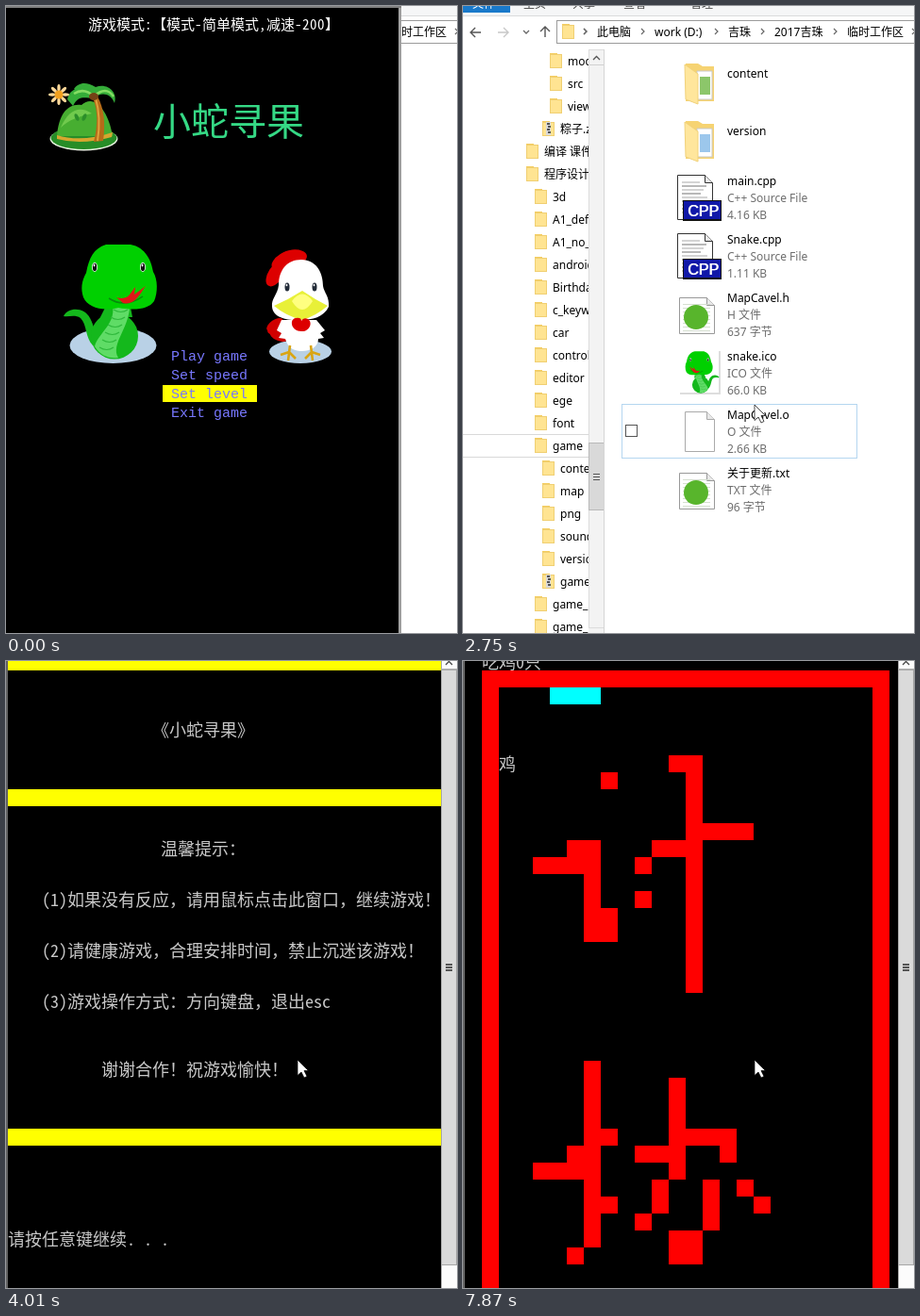
An HTML page with a canvas that plays this animation: 478x665 px, repeating every 8 s.

```html
<!DOCTYPE html>
<html lang="zh">
<head>
<meta charset="utf-8">
<title>Snake game</title>
<style>
html, body { margin: 0; width: 100%; height: 100%; overflow: hidden; background: #fff; }
canvas { display: block; }
</style>
</head>
<body>
<canvas id="stage" width="478" height="665"></canvas>
<script>
const g = document.getElementById('stage').getContext('2d');
const W = 478, H = 665, LOOP = 8000;
const UI = '"Noto Sans", "Noto Sans CJK SC", sans-serif';
const CJK = '"Noto Sans Mono CJK SC", "Noto Sans CJK SC", "Noto Sans Mono", monospace';
const TITLE = '"Noto Sans CJK SC", sans-serif';
const TEAL = '#008080', GREEN = '#008000', GOLD = '#ffff00', RED = '#ff0000';

function rect(x, y, w, h, color) {
  g.fillStyle = color;
  g.fillRect(x, y, w, h);
}

function frame(x, y, w, h, color) {
  g.strokeStyle = color;
  g.lineWidth = 1;
  g.strokeRect(x + 0.5, y + 0.5, w - 1, h - 1);
}

function oval(x, y, rx, ry, color, turn = 0) {
  g.fillStyle = color;
  g.beginPath();
  g.ellipse(x, y, rx, ry, turn, 0, 7);
  g.fill();
}

function shape(d, fill, line, width = 1) {
  const p = new Path2D(d);
  if (fill) { g.fillStyle = fill; g.fill(p); }
  if (line) { g.strokeStyle = line; g.lineWidth = width; g.stroke(p); }
}

// y is the middle of the line
function text(s, x, y, size, color, font = UI) {
  g.font = `${size}px ${font}`;
  g.fillStyle = color;
  g.fillText(s, x, y + size * 0.38);
}

// console type: wide glyphs take two cells
function grid(s, x, y, size, color, font = CJK, weight = 400) {
  g.font = `${weight} ${size}px ${font}`;
  g.fillStyle = color;
  for (const ch of s) {
    g.fillText(ch, x, y + size * 0.38);
    x += ch.charCodeAt(0) > 255 ? size : Math.ceil(size / 2);
  }
}

function cell(c, r, cw, color) {
  rect(2 + c * cw, r * 18 - 8, cw, 18, color);
}

// lines of cells through key points, as "column,row column,row"
function trace(color, cw, ...lines) {
  for (const line of lines) {
    const pts = line.split(' ').map(p => p.split(',').map(Number));
    pts.forEach(([c, r], i) => {
      const [c0, r0] = pts[Math.max(0, i - 1)];
      const n = Math.max(Math.abs(c - c0), Math.abs(r - r0), 1);
      for (let k = 0; k <= n; k++) {
        cell(Math.round(c0 + (c - c0) * k / n), Math.round(r0 + (r - r0) * k / n), cw, color);
      }
    });
  }
}

function pointer() {
  shape('M309 423V439.5L313 436L316 442L319 440.5L316 434.5H320.5Z', '#fff', '#000', 0.7);
}

/* ---- characters ---- */

function snake() {
  shape('M61 329C66 319 83 319 89 331C94 340 93 346 98 352L92 360C84 352 86 338 79 331C73 327 67 330 61 329Z', '#14b81c');
  shape('M108 314L100 330H134L131 314Z', '#14b81c');
  oval(115, 350, 25, 24.5, '#14b81c');
  shape('M112 314C119 336 98 346 94 361C101 372 110 374 119 373C110 358 133 340 131 314Z', '#5fdc66');
  for (let i = 0; i < 6; i++) {
    const x = 114 - i * 3, y = 322 + i * 8;
    shape(`M${x} ${y}Q${x + 8} ${y + 5} ${x + 15} ${y}`, null, '#2fb83c', 1.2);
  }
  shape('M106 253H132C148 256 154 270 156 282C161 290 161 304 157 313C151 322 136 323 119 320C102 324 87 320 82 309C79 300 80 292 85 283C88 267 93 257 106 253Z', '#00d000');
  shape('M109 310Q126 321 145 308', null, '#078b0c', 1.5);
  shape('M117 309C131 313 132 303 137 298L136 306L148 297C141 307 136 318 124 315Z', '#e01818');
  for (const x of [94, 145]) {
    oval(x, 277, 3, 5, '#fff');
    oval(x, 277, 2.2, 4.2, '#111');
    oval(x - 0.5, 275, 0.9, 1.4, '#fff');
  }
}

function chicken(white) {
  oval(312, 366.5, 33, 12.5, '#b9d1e6');
  for (let i = 0; i < 3; i++) oval(285 + i * 2, 338 + i * 6, 10, 5, '#d00000', -0.6 + i * 0.5);
  for (let i = 0; i < 4; i++) oval(286 + i * 9, 284 - 18 * Math.sin(i * 0.9), 15, 8, '#dd0000', -1 + i * 0.45);
  shape('M292 333L287 344L292 347L289 352L296 353C299 364 307 366 314 366C322 366 331 362 331 353L337 352L333 347L338 344L329 333Z', white);
  shape('M313 269C329 269 336 283 336 297C337 304 343 308 342 319C337 330 324 333 313 333C299 334 283 331 282 319C281 310 288 306 289 296C289 280 298 269 313 269Z', white);
  shape('M284 318Q300 311 314 302Q327 311 341 318Q328 329 314 333Q297 329 284 318Z', '#e8f038');
  shape('M303 313Q314 298 325 313Q314 331 303 313Z', '#ffff80');
  shape('M313 345C302 345 300 332 307 331Q313 330 313 334Q315 330 320 332C326 336 321 346 313 345Z', '#dd0000');
  for (const x of [298, 327]) {
    oval(x, 298, 2.5, 4.5, '#222b38');
    oval(x - 0.5, 296, 0.9, 1.3, '#fff');
  }
  shape('M301 360L299 376M300 367L291 370M300 367L307 374M323 360L325 376M324 367L333 370M324 367L317 374', null, '#d9a514', 2.6);
}

function island() {
  oval(82.5, 141, 36, 12.5, '#e8f4e0');
  oval(82.5, 140, 35, 12, '#278d27');
  shape('M54 138C56 115 65 103 80 105C94 92 109 112 113 138Z', '#47ae31');
  shape('M58 129C66 110 78 105 91 114C77 117 66 121 58 129Z', '#70ca4d');
  shape('M54 137Q80 145 113 134L112 139Q80 148 54 141Z', '#d6a72f');
  shape('M92 98Q100 116 93 144L103 143Q107 114 97 96Z', '#b66b18');
  shape('M95 98Q101 118 97 143', null, '#e0a13d', 2);
  shape('M93 98C84 83 68 85 65 99L71 106C77 94 84 98 93 98C100 91 111 92 115 103C119 91 107 81 95 86C84 79 76 82 72 88Z', '#35ad39');
  shape('M72 93Q83 86 93 96Q106 84 114 96', null, '#84dd63', 2.5);
  oval(93, 96, 5, 4, '#754215');
  for (const side of [-1, 1]) oval(79 + side * 4, 118, 2, 4, '#2c8e2a', side * 0.4);
  for (let i = 0; i < 8; i++) {
    const a = i * Math.PI / 4;
    oval(56 + Math.cos(a) * 7, 94 + Math.sin(a) * 7, 4, 1.7, '#ffd99a', a);
  }
  oval(56, 94, 4.5, 4.5, '#f2a01e');
}

/* ---- file manager ---- */

function folder(x, y) {
  rect(x, y - 8, 8, 15, '#f4cd60');
  rect(x + 1, y - 6, 11, 14, '#ffe492');
  frame(x, y - 7, 13, 15, '#f0cf72');
}

function zip(x, y) {
  folder(x, y);
  rect(x + 4, y - 7, 5, 14, '#d9d9d9');
  for (let i = 0; i < 4; i++) rect(x + 5 + i % 2, y - 6 + i * 3, 3, 2, '#555');
}

function bigFolder(y, tint) {
  shape(`M236 ${y - 20}H249L254 ${y - 17}H266V${y + 20}H236Z`, '#f6d372');
  shape(`M248 ${y - 12}H264V${y + 18}H248Z`, '#fff', '#c9c9c9');
  rect(251, y - 6, 11, 19, tint);
  shape(`M235 ${y - 19}L249 ${y - 9}V${y + 23}L236 ${y + 18}Z`, '#ffe69c', '#f1d27b');
}

function page(x, y, w, h, edge = '#aaa') {
  shape(`M${x} ${y}H${x + w - 8}L${x + w} ${y + 8}V${y + h}H${x}Z`, '#fff', edge);
  shape(`M${x + w - 8} ${y}V${y + 8}H${x + w}`, '#e8e8e8', edge);
}

function cppIcon(y) {
  page(227.5, y - 23.5, 37, 47, '#333');
  for (let i = 0; i < 9; i++) rect(232, y - 17 + i * 4, 19 + i * 7 % 10, 2, i % 2 ? '#b8b8b8' : '#d4d4d4');
  rect(233, y + 3, 41, 22, '#111');
  rect(234, y + 4, 39, 19, '#1018a8');
  text('CPP', 238, y + 14, 16, '#fff', '"Liberation Sans", sans-serif');
  text('CPP', 238.7, y + 14, 16, '#fff', '"Liberation Sans", sans-serif');
}

function noteIcon(y) {
  page(229.5, y - 17.5, 37, 38, '#999');
  for (let i = 0; i < 8; i++) rect(233, y - 11 + i * 4, 29, 1, '#d5dfd0');
  oval(247, y + 3, 13, 13, '#58b52c');
}

function snakeIcon() {
  rect(230, 366, 43, 46, '#ddd');
  rect(229, 365, 42, 45, '#fff');
  g.save();
  g.translate(294, 274);
  g.scale(-0.365, 0.365);
  snake();
  g.restore();
}

const FILES = [
  ['main.cpp', 'C++ Source File', '4.16 KB', cppIcon],
  ['Snake.cpp', 'C++ Source File', '1.11 KB', cppIcon],
  ['MapCavel.h', 'H 文件', '637 字节', noteIcon],
  ['snake.ico', 'ICO 文件', '66.0 KB', snakeIcon],
  ['MapCavel.o', 'O 文件', '2.66 KB', y => page(235.5, y - 20.5, 31, 42)],
  ['关于更新.txt', 'TXT 文件', '96 字节', noteIcon]
];

function files() {
  bigFolder(81, '#8cc66a');
  text('content', 280, 71, 12, '#000');
  bigFolder(142, '#9cc7ec');
  text('version', 280, 132, 12, '#000');
  frame(168, 422, 250, 58, '#b5d6f0');
  frame(172, 444, 13, 13, '#555');
  FILES.forEach(([name, kind, size, icon], i) => {
    const y = 203 + i * 62;
    icon(y);
    text(name, 280, y - 18, 12, '#000');
    text(kind, 280, y, 12, '#6d6d6d');
    text(size, 280, y + 18, 12, '#6d6d6d');
  });
}

// icon column, then the names below it
const TREE = [
  [92, 'module src view'], [84, '粽子.zip'], [67, '编译_课件 程序设计'],
  [76, '3d A1_def A1_no_ android Birthday c_keyw car control editor ege font game'],
  [84, 'content map png sound version game.zip'], [76, 'game_ game_']
];

function tree() {
  g.save();
  g.beginPath();
  g.rect(0, 44, 133, H);
  g.clip();
  frame(-1, 454, 136, 25, '#d9d9d9');
  let y = 58;
  for (const [x, names] of TREE) {
    for (const s of names.split(' ')) {
      (s.endsWith('.zip') ? zip : folder)(x, y);
      text(s.replace('译_', '译 '), x + 19, y, 12, '#000');
      y += 24;
    }
  }
  g.restore();
  rect(133, 46, 17, H, '#f3f3f3');
  frame(133, 46, 17, 17, '#d0d0d0');
  frame(133, 46, 17, 614, '#dcdcdc');
  shape('M138 57L141.5 53.5L145 57', null, '#555', 1.3);
  rect(134, 463, 15, 72, '#d9d9d9');
  frame(133, 463, 17, 72, '#b9b9b9');
  for (let k = 0; k < 3; k++) rect(138, 496 + k * 3, 7, 1, '#555');
  rect(149, 46, 1, H, '#d5d5d5');
}

function explorer() {
  rect(0, 0, W, H, '#fff');
  rect(0, 0, W, 10, '#f5f6f7');
  rect(0, 0, 50, 7, '#1979ca');
  text('文件', 10, -3, 12, '#fff');
  [['主页', 64], ['共享', 116], ['查看', 170], ['管理', 241]].forEach(([s, x]) => text(s, x, -3, 12, '#444'));
  rect(0, 10, W, 1, '#dadbdc');
  frame(99, 15, 400, 25, '#9b9b9b');
  shape('M19 28H8M13 23L8 28L13 33', null, '#555', 1.4);
  shape('M37 28H48M43 23L48 28L43 33', null, '#c8c8c8', 1.4);
  shape('M64 26L67 29L70 26', null, '#666', 1.3);
  shape('M87 33V22M82 27L87 22L92 27', null, '#555', 1.4);
  folder(105, 27);
  [['', 142], ['此电脑', 142], ['work (D:)', 203], ['吉珠', 281], ['2017吉珠', 330], ['临时工作区', 407], ['', 490]]
    .forEach(([s, x]) => {
      text(s, x, 27, 12, '#000');
      shape(`M${x - 14} 24L${x - 11} 27L${x - 14} 30`, null, '#666', 1.2);
    });
  tree();
  files();
}

/* ---- game menu ---- */

function menu(t) {
  const fresh = t < 500;
  rect(0, 0, 416, H, '#000');
  rect(416, 0, 3, H, fresh ? '#a0a0a0' : '#5c5c5c');
  rect(0, 0, 419, 2, fresh ? '#808080' : '#555');
  if (!fresh) {
    rect(277, 0, 94, 1, '#333');
    rect(371, 0, 45, 1, '#c44');
    if (t < 1210) return;
  }
  grid('游戏模式:【模式-简单模式,减速-200】', 87, 19, 15, '#fff');
  island();
  grid('小蛇寻果', 156, 122, 40, '#35d985', TITLE, 300);
  oval(113.5, 360, 46, 19, '#b9d1e6');
  snake();
  chicken(fresh ? '#fff' : '#f8faff');
  const pick = t < 1800 ? 2 : t < 2380 ? 1 : 0;
  rect(166, 362 + pick * 20, 100, 18, GOLD);
  ['Play game', 'Set speed', 'Set level', 'Exit game'].forEach((s, i) =>
    text(s, 175, 370 + i * 20, 15, '#7878ff', '"Liberation Mono", monospace'));
}

/* ---- console ---- */

function consoleWindow(top, bottom) {
  rect(0, 0, W, H, '#000');
  rect(0, 0, 2, H, '#626262');
  rect(461, 0, 17, H, '#fcfcfc');
  rect(461, top, 17, bottom - top, '#dadada');
  frame(461, top - 1, 17, bottom - top + 2, '#a6a6a6');
  rect(461, 0, 1, H, '#a6a6a6');
  rect(461, 8, 17, 1, '#b5b5b5');
  shape('M466 4L469.5 0.5L473 4', null, '#444', 1.3);
  const mid = Math.round((top + bottom) / 2);
  for (let k = -1; k < 2; k++) rect(466, mid - 1 + k * 3, 7, 2, '#555');
}

function notice() {
  for (const y of [-8, 136, 496]) rect(2, y, 459, 18, GOLD);
  const put = (s, col, row) => grid(s, 2 + col * 9, row * 18 + 1, 18, '#c8c8c8');
  put('《小蛇寻果》', 17, 4);
  put('温馨提示：', 18, 11);
  put('(1)如果没有反应，请用鼠标点击此窗口，继续游戏！', 4, 14);
  put('(2)请健康游戏，合理安排时间，禁止沉迷该游戏！', 4, 17);
  put('(3)游戏操作方式：方向键盘，退出esc', 4, 20);
  put('谢谢合作！祝游戏愉快！', 11, 24);
  put('请按任意键继续. . .', 0, 34);
}

function noise(n) {
  const s = Math.sin(n * 127.1) * 43758.5;
  return s - Math.floor(s);
}

// outlines turned into 9 by 18 blocks
const HEAD = 'M155 -8H335L326 10V64L344 66Q380 130 352 216L344 240L315 256H173L146 240Q108 145 141 82L147 64H164L155 46Z';
const BODY = 'M200 262H290L268 330L261 424L282 410V370L326 318V300L335 282H345L352 300V332L340 350L330 400L352 406L362 424L371 470H398L416 486V550L434 586V680H128V606L155 580V534L173 498L191 490V442L209 406L218 400V330L205 300Z';
const EYES = 'M191 10H209L218 28V64H209V82H200V64H191ZM272 10H290V28H299V46H290V82H272ZM227 244H254V262H227Z';
const SHADE = [
  'M227 226H263V244H227ZM173 244H191V262H173ZM254 244H281V262H254ZM299 244H317V262H299Z',
  'M326 298H335V334L310 370L299 388H281V370L308 334H326Z',
  'M245 424H308V460H281V442H245Z',
  'M317 460H362V478H398V496H353V514H317V532H272V514H290V496H317Z',
  'M344 550H371V568H425V586H434V604H380V622H326V640H299V622H290V604H335V568H344Z',
  'M137 586H200V604H182V622H173V640H137V622H128V604ZM236 568H254V622H236Z'
].join('');
const THROAT = 'M218 262H272V280H263V298H227V280H218Z';

function blocks(d, color, fleck) {
  const path = new Path2D(d), list = [];
  for (let r = 0; r < 38; r++) {
    for (let c = 14; c < 49; c++) {
      if (!g.isPointInPath(path, 6.5 + c * 9, r * 18 + 1)) continue;
      const n = fleck ? noise(r * 49 + c) : 1;
      list.push([c, r, 9, n < 0.015 ? GOLD : n < 0.05 ? TEAL : color]);
    }
  }
  return list;
}

const ART = [
  ...blocks(HEAD, GREEN, true), ...blocks(BODY, GREEN, true),
  ...blocks(EYES, '#000'), ...blocks(SHADE, TEAL), ...blocks(THROAT, GOLD)
];

function blockSnake() {
  for (const b of ART) cell(...b);
  // bright edges of neck, tail and coils
  trace(GOLD, 9, '29,18 28,19 27,20 25,21', '37,20 35,22 35,23', '23,24 21,27',
    '19,30 17,32', '45,30 42,32', '31,32 33,32 34,33 36,33', '20,32 21,32');
}

function board(t) {
  trace(RED, 18, '1,38 1,1 24,1 24,38');
  // upper glyph
  trace(RED, 18, '12,6 13,6 13,19', '13,10 16,10', '10,12 11,11 13,11', '10,14', '8,7',
    '4,12 7,12', '6,11 7,11 7,16 8,16 8,15');
  // lower glyph
  trace(RED, 18, '7,24 7,34 6,35', '8,28 7,28 6,29 6,30 4,30', '8,32', '10,29 12,29',
    '12,25 12,30 11,31 11,32 10,33', '13,28 15,28 15,29', '14,31 14,33', '16,31 17,32',
    '12,34 13,34 13,35 12,35');
  if (t < 7470) return;
  grid('吃鸡0只', 20, 1, 18, '#c8c8c8');
  grid('鸡', 38, 109, 18, '#c8c8c8');
  const tail = t < 7750 ? 3 : t < 7870 ? 4 : 5;
  trace('#00ffff', 18, `${tail},2 ${tail + 2},2`);
}

function draw(t) {
  if (t < 4010) {
    explorer();
    if (t < 2750) menu(t);
    if (t >= 3860) {
      rect(0, 0, W, 359, '#000');
      rect(0, 0, 2, 359, '#626262');
    }
  } else {
    const scroll = t >= 5130 && t < 7470 ? 49 : 0;
    consoleWindow(10 + scroll, 640 + scroll);
    if (t < 5010) notice();
    else if (t < 7160) blockSnake();
    else if (t >= 7310) board(t);
  }
  if (t >= 1210) pointer();
}

function tick(now) {
  draw(now % LOOP);
  requestAnimationFrame(tick);
}
requestAnimationFrame(tick);
</script>
</body>
</html>
```
